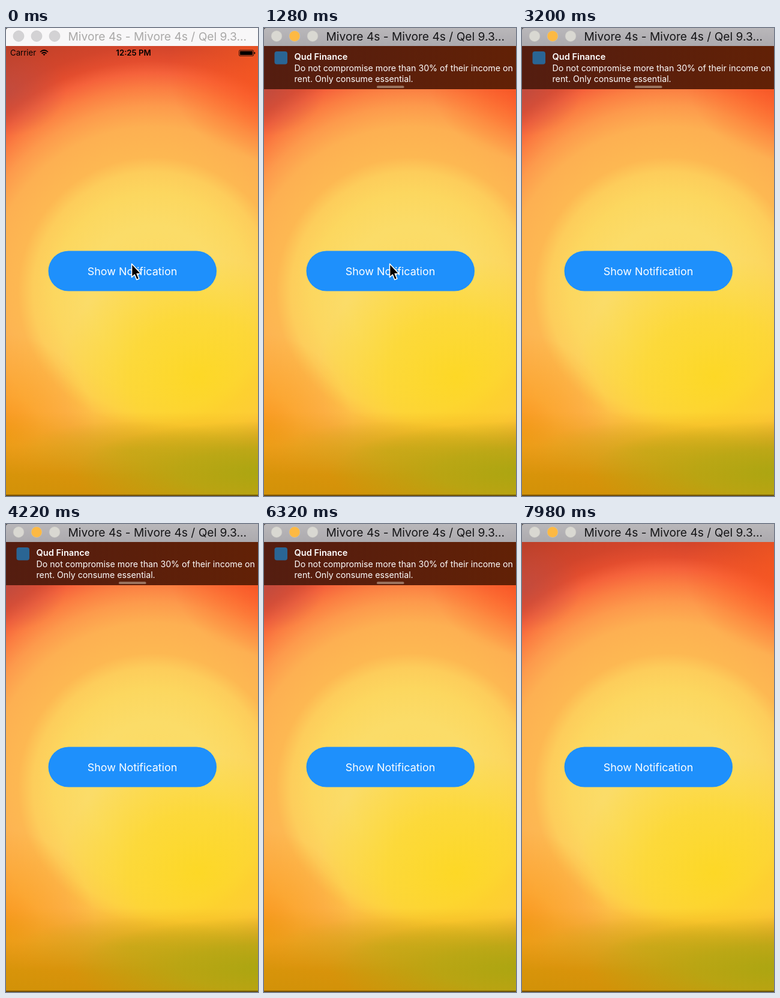
Recreate the animation shown at these times as an HTML page. Size 420x780 px, loop 8 s.

```html
<!DOCTYPE html>
<html lang="en">
<head>
<meta charset="utf-8">
<title>Notification banner</title>
<style>
  html, body { margin: 0; width: 100%; height: 100%; overflow: hidden; }
  body {
    background:
      linear-gradient(transparent 777px, rgba(70, 45, 5, .75) 779px),
      radial-gradient(330px 85px at 440px 740px, rgba(165, 168, 18, .9), rgba(178, 168, 20, .8) 45%, transparent),
      radial-gradient(190px 50px at 210px 705px, rgba(196, 168, 20, .6), transparent),
      linear-gradient(transparent 640px, rgba(228, 160, 20, .6) 695px, rgba(214, 148, 8, .95) 745px, #d29208 780px),
      radial-gradient(150px 170px at 0 680px, #f8981a, rgba(251, 165, 40, .75) 40%, transparent),
      radial-gradient(230px 200px at 320px 580px, rgba(253, 216, 32, .9), rgba(253, 216, 40, .7) 50%, transparent),
      radial-gradient(170px 150px at 440px 70px, rgba(255, 92, 30, .8), transparent),
      radial-gradient(100px 75px at 0 105px, rgba(185, 80, 74, .6), transparent),
      radial-gradient(circle at 245px 440px, #fcdb62, #fbdc68 110px, #fcd75f 165px, #fdcd5b 200px,
        #fdb852 225px, #fdb052 275px, #fd9a4c 310px, #fb7e42 340px, #f5623b 365px, #e34d2e 385px,
        #d2452b 410px, #bd4029 470px);
  }
  svg { display: block; }
  text { font-family: Inter, Roboto, sans-serif; white-space: pre; }
</style>
</head>
<body>
<svg width="420" height="780" viewBox="0 0 420 780">
  <defs>
    <linearGradient id="bannerFill">
      <stop stop-color="#541d10"/>
      <stop offset="1" stop-color="#622106"/>
    </linearGradient>
    <linearGradient id="barFill" x2="0" y2="1">
      <stop stop-color="#b9b7ba"/>
      <stop offset="1" stop-color="#acaaae"/>
    </linearGradient>
  </defs>

  <g id="status" font-size="13.2">
    <text x="7" y="46">Carrier</text>
    <g fill="none" stroke="#000" stroke-width="1.7">
      <path d="M57 40Q63.500 34 70 40M59.500 42.500Q63.500 39 67.500 42.500"/>
      <path d="M61.500 44L63.500 46L65.500 44Q63.500 42.500 61.500 44Z" fill="#000" stroke="none"/>
    </g>
    <text x="212.500" y="46" text-anchor="middle" font-weight="600">12:25 PM</text>
    <rect x="388.500" y="37" width="24" height="9.500" rx="1.500" fill="none" stroke="#000" stroke-width=".8"/>
    <rect x="390" y="38.500" width="21" height="6.500"/>
    <rect x="413.500" y="40" width="1.700" height="3.500" rx=".8"/>
  </g>

  <rect x="70.500" y="371.500" width="280.500" height="67" rx="33.500" fill="#1e90fc"/>
  <text id="label" x="210.500" y="411.500" text-anchor="middle" font-size="17.900" fill="#fff">Show Notification</text>

  <g id="banner" fill="#fff" font-size="14.200">
    <rect y="30" width="420" height="72" fill="url(#bannerFill)"/>
    <rect x="17.500" y="39" width="21.500" height="21.500" rx="4" fill="#2a6594"/>
    <text x="50.500" y="53" font-size="14.600" font-weight="600">Qud Finance</text>
    <text x="50.500" y="72">Do not compromise more than 30% of their income on</text>
    <text x="50.500" y="89.500">rent. Only consume essential.</text>
    <rect x="188" y="96.300" width="45.500" height="3.800" rx="1.900" fill="#9c7662"/>
  </g>

  <rect id="bar" width="420" height="30"/>
  <path d="M0 0H4Q0 0 0 4Z" fill="#443c38"/>
  <g id="lights" stroke-width=".6">
    <circle cx="21" cy="13.500" r="9"/>
    <circle id="middleLight" cx="51" cy="13.500" r="9"/>
    <circle cx="81" cy="13.500" r="9"/>
  </g>
  <text id="title" x="103.500" y="21" font-size="19.200">Mivore 4s - Mivore 4s / Qel 9.3...</text>

  <path id="cursor" d="M209.500 393V415.500L214.300 411L217.800 419.500L221.800 417.800L218.200 409.500H225Z"
    stroke="#fff" stroke-width="1.600" stroke-linejoin="round"/>
</svg>
<script>
  const LOOP = 8000;
  const ACTIVATE = 400, PRESS = 540, RELEASE = 676, CURSOR_GONE = 1500, DISMISS = 7225;
  const SLIDE = 500, FADE = 470, BANNER_HEIGHT = 72;

  const el = id => document.getElementById(id);
  const set = (id, name, value) => el(id).setAttribute(name, value);
  const show = (id, visible) => set(id, 'visibility', visible ? 'visible' : 'hidden');
  const progress = (t, start, duration) => Math.min(1, Math.max(0, (t - start) / duration));
  const easeOut = p => 1 - (1 - p) ** 1.7;

  function draw() {
    const t = performance.now() % LOOP;
    const active = t >= ACTIVATE;

    set('bar', 'fill', active ? 'url(#barFill)' : '#f8f7f8');
    set('title', 'fill', active ? '#151517' : '#aaa9a8');
    set('lights', 'fill', active ? '#d9d8d2' : '#d3d2d4');
    set('lights', 'stroke', active ? '#c6c4c2' : '#c5c4c6');
    set('middleLight', 'fill', active ? '#fdb943' : '#d3d2d4');

    const pressed = t >= PRESS;
    set('label', 'fill-opacity', pressed ? 0.2 + 0.8 * progress(t, RELEASE, FADE) : 1);

    const shown = easeOut(progress(t, RELEASE, SLIDE)) - easeOut(progress(t, DISMISS, SLIDE));
    set('banner', 'transform', `translate(0 ${Math.round(BANNER_HEIGHT * (shown - 1))})`);
    show('banner', shown > 0);
    show('status', t < RELEASE);
    show('cursor', t < CURSOR_GONE);

    requestAnimationFrame(draw);
  }
  draw();
</script>
</body>
</html>
```
